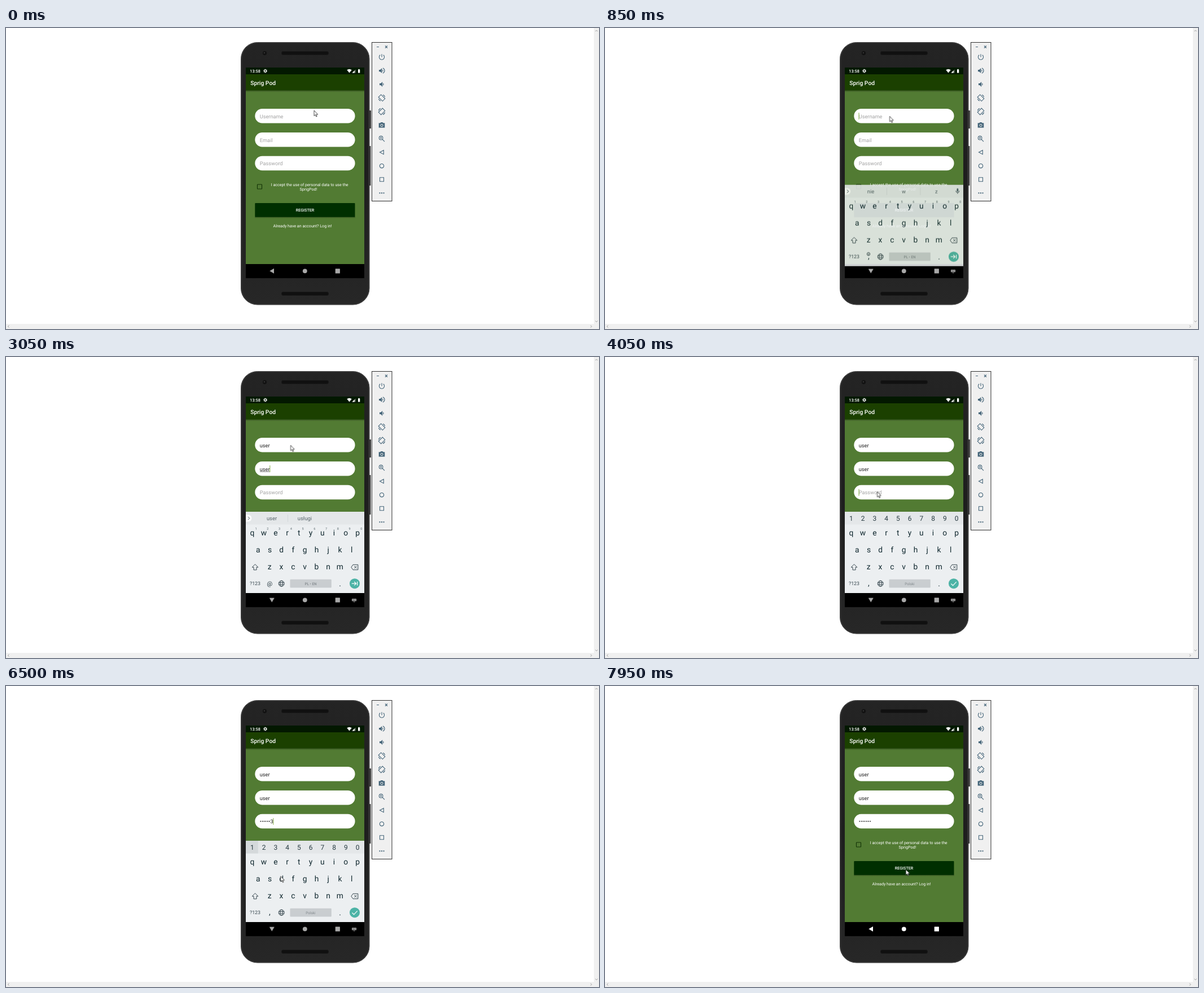
An HTML page for the animation above (8000 ms loop, 1051 by 533 pixels).

```html
<!DOCTYPE html>
<html lang="en">
<head>
<meta charset="utf-8">
<title>Register form</title>
<style>
html, body { margin: 0; width: 100%; height: 100%; overflow: hidden; background: #fff; }
svg { display: block; width: 100%; height: 100%; }
text { font-family: Roboto, "Noto Sans", sans-serif; text-rendering: geometricPrecision; }
.mid { text-anchor: middle; }
.white { fill: #fff; }
.line { fill: none; stroke: #46667a; stroke-width: 1.1; }
.solid { fill: #46667a; }
.key { font-size: 13.8px; fill: #10282f; }
.sup { font-size: 5.6px; fill: #5d6b71; }
.digit { font-size: 12px; fill: #263940; }
.word { font-size: 9.4px; fill: #56646a; }
.icon { fill: none; stroke: #37474f; stroke-width: 1; }
.lang { font-size: 6.4px; fill: #82898d; }

.loop { animation: 8s step-end infinite; }
#cursor { animation-name: point; }
#board { animation-name: board; }
#back { animation-name: turn; transform-origin: 471.3px 430.3px; }
#hide { animation-name: hide; }
#ripple { animation-name: ripple; }
#nav { animation-name: wake; }

@keyframes point {
  0% { transform: translate(546px, 146px); animation-timing-function: steps(4); }
  2.5%, 42.5% { transform: translate(504.5px, 156.3px); }
  42.5% { animation-timing-function: steps(6); }
  46.25%, 79.375% { transform: translate(482.5px, 238.5px); }
  79.375% { animation-timing-function: steps(3); }
  81.25% { transform: translate(486.7px, 336.7px); animation-timing-function: steps(4); }
  83.75% { transform: translate(485px, 451px); animation-timing-function: steps(7); }
  88.125%, 90% { transform: translate(472px, 431px); }
  90% { animation-timing-function: steps(2); }
  91.25% { transform: translate(497.7px, 421.5px); animation-timing-function: steps(8); }
  96.25% { transform: translate(529px, 343px); animation-timing-function: steps(5); }
  99.375%, 100% { transform: translate(533.2px, 325px); }
}
@keyframes board {
  0% { opacity: 0; transform: translateY(9px); }
  10% { opacity: .6; transform: translateY(9px); }
  10.625% { opacity: .88; transform: translateY(3.7px); }
  11.25% { opacity: .97; transform: translateY(1px); }
  11.875% { opacity: 1; transform: none; }
  90.625% { opacity: .95; transform: translateY(2px); }
  91.25% { opacity: .8; transform: translateY(6px); }
  91.875% { opacity: .5; transform: translateY(10px); }
  92.5% { opacity: .2; transform: translateY(13px); }
  93.125%, 100% { opacity: 0; transform: translateY(14px); }
}
@keyframes turn {
  0% { transform: rotate(0deg); }
  6.875% { transform: rotate(-45deg); }
  7.5% { transform: rotate(-90deg); }
  90.625%, 100% { transform: rotate(0deg); }
}
@keyframes hide {
  0% { opacity: 0; }
  6.875% { opacity: .5; }
  7.5% { opacity: 1; }
  90.625%, 100% { opacity: 0; }
}
@keyframes ripple {
  0% { opacity: 0; }
  90% { opacity: .6; }
  90.625% { opacity: 1; animation-timing-function: steps(6); }
  95%, 100% { opacity: 0; }
}
@keyframes wake {
  0%, 90% { fill: #a9a9a9; }
  90% { animation-timing-function: steps(6); }
  93.75%, 100% { fill: #fff; }
}
</style>
</head>
<body>
<svg viewBox="0 0 1051 533" preserveAspectRatio="none">
  <defs>
    <linearGradient id="body" x2="0" y2="1">
      <stop offset="0" stop-color="#242424"/><stop offset=".5" stop-color="#1e1e1e"/><stop offset="1" stop-color="#272727"/>
    </linearGradient>
    <linearGradient id="shade" x2="0" y2="1">
      <stop offset="0" stop-opacity=".28"/><stop offset="1" stop-opacity="0"/>
    </linearGradient>
  </defs>

  <!-- window scrollbars -->
  <path d="M1042 0h9v533H0v-9h1042z" fill="#f0f0f0"/>
  <path d="M1044.5 6l2-2 2 2M1044.5 518.500l2 2 2-2M5.500 526.500l-2 2 2 2M1036 526.500l2 2-2 2" fill="none" stroke="#999"/>

  <!-- phone -->
  <path d="M644 146h3v32h-3zM644 209h2.500v70h-2.500z" fill="#353535"/>
  <rect x="416.500" y="25.500" width="227.500" height="464.500" rx="29" fill="#2d2d2d" stroke="#454545"/>
  <rect x="418.500" y="27.500" width="223.500" height="460.500" rx="27" fill="url(#body)"/>
  <g fill="#101010" stroke="#181818">
    <rect x="488.500" y="41.500" width="83" height="6" rx="2.500"/>
    <rect x="488.500" y="467.500" width="83" height="6" rx="2.500"/>
    <circle cx="458.500" cy="44.500" r="3.500"/>
  </g>
  <circle cx="458" cy="44" r="1.300" fill="#343434"/>

  <!-- app -->
  <rect x="425" y="70" width="210" height="373" fill="#527b33"/>
  <rect x="425" y="70" width="210" height="12.300" fill="#031800"/>
  <rect x="425" y="82" width="210" height="28.700" fill="#1b4000"/>
  <rect x="425" y="110.700" width="210" height="3" fill="url(#shade)"/>
  <text x="432.300" y="79" font-size="7.300" font-weight="500" class="white">13:58</text>
  <circle cx="459.600" cy="76" r="1.900" fill="none" stroke="#fff" stroke-width="1.300"/>
  <circle cx="459.600" cy="76" r="2.900" fill="none" stroke="#fff" stroke-width="1" stroke-dasharray="1.500 1.537"/>
  <path d="M604.300 74.300q4.200-3.200 8.400 0L608.500 79.500z" class="white"/>
  <path d="M613.500 79.500l6-6v6z" fill="#fff" opacity=".45"/>
  <path d="M613.500 79.500l4-4v4zM624 73.500h.8v-.8h1.600v.8h.9v6H624z" class="white"/>
  <text x="433.200" y="100.700" font-size="10.300" font-weight="500" class="white">Sprig Pod</text>

  <g id="fields"></g>
  <rect id="caret" width="1" height="12" fill="#86b049"/>

  <rect x="445.500" y="277" width="8" height="8" rx=".6" fill="none" stroke="#123306" stroke-width="1.100"/>
  <g class="mid white" font-size="7.150">
    <text x="538.200" y="279.700">I accept the use of personal data to use the</text>
    <text x="536" y="288.200">SprigPod!</text>
    <text x="525.500" y="352.700">Already have an account? Log in!</text>
  </g>
  <rect x="441" y="334" width="178" height="3.500" fill="url(#shade)"/>
  <rect x="441.300" y="310" width="177.200" height="24.800" rx="1" fill="#002f00"/>
  <text x="530" y="325.200" font-size="7.150" font-weight="500" class="mid white">REGISTER</text>

  <!-- navigation bar -->
  <rect x="425" y="418" width="210" height="25" fill="#000"/>
  <rect id="ripple" class="loop" x="446" y="419.500" width="50.500" height="22" rx="11" fill="#202020"/>
  <g id="nav" class="loop">
    <path id="back" class="loop" d="M467.300 430.300L475 425.800v9z"/>
    <circle cx="529.800" cy="430.300" r="3.900"/>
    <rect x="583.700" y="426.300" width="8.200" height="8.200" rx=".5"/>
    <g id="hide" class="loop">
      <rect x="613" y="428" width="8" height="4.300" rx=".5"/>
      <path d="M615.500 433h3l-1.500 1.400z"/>
      <path d="M614 429.300h6M614 430.600h6" stroke="#000" stroke-width=".6" stroke-dasharray=".7 .6"/>
    </g>
  </g>

  <!-- on-screen keyboard -->
  <g id="board" class="loop">
    <rect x="425" y="274" width="210" height="144" fill="#eceff1"/>
    <rect x="425" y="274" width="210" height="22.500" fill="#e4e7e9"/>
    <g data-modes="01">
      <path d="M425 279.500h4.300a6 6 0 0 1 0 12H425z" class="white"/>
      <path d="M429 282.800l2.700 2.700-2.700 2.700" class="icon"/>
      <g id="words"></g>
    </g>
    <g data-modes="0">
      <rect x="623.500" y="280.300" width="2.800" height="5.800" rx="1.400" fill="#455a64"/>
      <path d="M621.800 284.500a3.100 3.100 0 0 0 6.200 0M624.900 287.600v2.200" class="icon"/>
    </g>
    <rect id="pressed" x="425" y="274" width="21.800" height="22.500" fill="#d5d9db"/>
    <g id="digits" data-modes="2"></g>
    <g id="keys"></g>
    <g id="sups" data-modes="01"></g>

    <path d="M441.500 367l5.300 5.300h-2.800v4.700h-5v-4.700h-2.800z" class="icon"/>
    <path d="M611.800 372.300l3.200-4.500h8.800v9H615zM617.300 370.200l4.200 4.200m0-4.200l-4.200 4.200" class="icon"/>
    <text x="441.500" y="404.400" font-size="8.800" fill="#37474f" class="mid">?123</text>
    <g data-modes="0">
      <circle cx="467" cy="396.500" r="2.700" class="icon" stroke-width=".7"/>
      <path d="M465.700 397.200q1.300 1.300 2.600 0M465.900 395.600h.7M467.500 395.600h.7" class="icon"/>
    </g>
    <text x="467.300" y="405" class="key mid" data-modes="02">,</text>
    <text x="467.300" y="405" font-size="10.800" fill="#263940" class="mid" data-modes="1">@</text>
    <g class="icon">
      <circle cx="488.200" cy="401.200" r="5"/>
      <ellipse cx="488.200" cy="401.200" rx="2.200" ry="5"/>
      <path d="M483.700 399.500h9M483.700 402.900h9"/>
    </g>
    <rect x="503.500" y="393.800" width="73.300" height="14.700" rx="1" fill="#c9cdd0"/>
    <text x="540" y="403.500" class="lang mid" font-weight="500" data-modes="01">PL • EN</text>
    <text x="540" y="403.500" class="lang mid" data-modes="2">Polski</text>
    <text x="592" y="405.500" class="key mid">.</text>
    <circle cx="618" cy="401.200" r="9" fill="#4db3a6"/>
    <g fill="none" stroke="#fff" stroke-width="1.200">
      <path d="M612.800 401.200h7.500M617.300 398l3.200 3.200-3.200 3.200M622.600 397.800v6.800" data-modes="01"/>
      <path d="M613.500 401.500l3.100 3.100 6-6.300" data-modes="2"/>
    </g>
  </g>

  <!-- emulator tool strip -->
  <rect x="648.500" y="25.500" width="35.500" height="281" fill="#f0f0f0" stroke="#303030"/>
  <path d="M657 33.500h4M672 31.500l4 4m0-4l-4 4" class="line"/>
  <g id="tools"></g>

  <path id="cursor" class="loop" d="M0 0v9.600l2.200-2 1.500 3.500 1.500-.7-1.500-3.300h3z" fill="#fff" stroke="#222" stroke-width=".8"/>
</svg>

<script>
const LOOP = 8000, STEP = 50, LEFT = 449.800, KEY_W = 20.750;
const $ = id => document.getElementById(id);

function add(parent, tag, attrs, text = '') {
  const el = document.createElementNS('http://www.w3.org/2000/svg', tag);
  for (const name in attrs) el.setAttribute(name, attrs[name]);
  el.textContent = text;
  parent.appendChild(el);
  return el;
}

// One line of evenly spaced labels
function row(parent, chars, x, y, cls) {
  [...chars].forEach((c, i) => add(parent, 'text', { x: x + i * KEY_W, y, class: cls + ' mid' }, c));
}
row($('keys'), 'qwertyuiop', 436.300, 316, 'key');
row($('keys'), 'asdfghjkl', 446.700, 346.200, 'key');
row($('keys'), 'zxcvbnm', 467.300, 376.300, 'key');
row($('sups'), '1234567890', 443, 306, 'sup');
row($('digits'), '1234567890', 436.300, 290.300, 'digit');

// Tool icons: outline and filled part, drawn around the centre
const tilt = 'M-5.800 -1.300L-1.300 -5.800L5.800 1.300L1.300 5.800zM2 -5.300q3 .8 3.500 3.800M-2 5.300q-3 -.8 -3.500 -3.800';
const tools = [
  ['M-2.800 -3.700A4.600 4.600 0 1 0 2.800 -3.700M0 -5.300V0'],
  ['M1.900 -4.500a4.800 4.800 0 0 1 0 9', 'M-5 -1.700h2.300L.2 -4.500v9L-2.700 1.700H-5zM1.300 -2.300a2.700 2.700 0 0 1 0 4.600z'],
  ['', 'M-4 -1.700h2.300L1.200 -4.500v9L-1.700 1.700H-4zM2.300 -2.300a2.700 2.700 0 0 1 0 4.600z'],
  [tilt],
  [tilt],
  ['', 'M-5.300 -3.600h2.700l1 -1.200h3.200l1 1.200h2.700v8.200H-5.300z'],
  ['M-4.700 -1.300a3.300 3.300 0 1 0 6.600 0a3.300 3.300 0 1 0 -6.600 0M1 1.200l4 4M-3 -1.300h3.200M-1.400 -2.900v3.200'],
  ['M-3.500 0L3.300 -3.600v7.200z'],
  ['M-3.700 0a3.700 3.700 0 1 0 7.400 0a3.700 3.700 0 1 0 -7.400 0'],
  ['M-3.500 -3.500h7v7h-7z'],
  ['', 'M-4.500 -1h2v2h-2zM-1 -1h2v2h-2zM2.500 -1h2v2h-2z']
];
tools.forEach(([line, solid], i) => {
  const flip = i === 4 ? ' scale(-1 1)' : '';
  const g = add($('tools'), 'g', { transform: `translate(666 ${51.500 + i * 24.080})${flip}` });
  if (solid) add(g, 'path', { d: solid, class: 'solid' });
  if (line) add(g, 'path', { d: line, class: 'line' });
  if (i === 5) add(g, 'circle', { cy: .5, r: 2.100, fill: '#46667a', stroke: '#f0f0f0' });
});

// focus: when the caret enters; done: when the composing underline goes
const fields = [
  { hint: 'Username', focus: 450, done: 1850, keys: [[1200, 'u'], [1300, 'us'], [1450, 'use'], [1600, 'user']] },
  { hint: 'Email', focus: 1850, done: 3950, keys: [[2600, 'u'], [2700, 'us'], [2850, 'use'], [3050, 'user']] },
  { hint: 'Password', focus: 4000, done: 0, keys: [] }
];
const secret = 'user123';
[5150, 5250, 5400, 5550, 5950, 6050, 6100].forEach((at, i) =>
  fields[2].keys.push([at, '•'.repeat(i) + secret[i]]));
fields[2].keys.push([7600, '•'.repeat(7)]);

fields.forEach((f, i) => {
  const y = f.y = 143 + i * 41.900;
  add($('fields'), 'rect', { x: 441.300, y, width: 177.300, height: 25.500, rx: 12.750, fill: '#fff' });
  f.text = add($('fields'), 'text', { x: LEFT, y: y + 16.600, 'font-size': 9.200 });
  f.under = add($('fields'), 'rect', { x: LEFT, y: y + 17.800, height: .7, fill: '#444' });
});

const hints = [
  [0, 'nie', 'w', 'z'], [1250, 'u', 'już', 'usta'], [1350, 'us', 'usługi', 'usta'],
  [1450, 'use', 'usługi', 'usunąć'], [1600, 'user', 'usera', 'userami'], [1900],
  [2700, 'us', 'usługi'], [2850, 'use', 'usługi'], [3050, 'user', 'usługi'], [3950]
];
const words = [471, 529.500, 587.300].map(x => add($('words'), 'text', { x, y: 288.600, class: 'word mid' }));
const bars = [499, 558.500].map(x => add($('words'), 'rect', { x, y: 279, width: .8, height: 13, fill: '#cfd4d6' }));

const last = (list, t) => list.filter(e => e[0] <= t).pop();
const show = (el, on) => { el.style.display = on ? '' : 'none'; };
const modal = [...document.querySelectorAll('[data-modes]')];

function draw(t) {
  let active = null;
  for (const f of fields) {
    const key = last(f.keys, t);
    f.text.textContent = key ? key[1] : f.hint;
    f.text.setAttribute('fill', key ? '#222' : '#a3a3a3');
    f.width = key ? f.text.getComputedTextLength() : 0;
    f.under.setAttribute('width', f.width);
    show(f.under, key && t < f.done);
    if (t >= f.focus) active = f;
  }
  const caret = $('caret');
  show(caret, false);
  if (active) {
    const typed = last(active.keys.filter(k => k[0] < 7000), t);
    const since = t - (typed ? typed[0] : active.focus);
    show(caret, since % 1000 < 500);
    caret.setAttribute('x', LEFT - .3 + active.width);
    caret.setAttribute('y', active.y + 7);
  }
  const mode = t < 1900 ? '0' : t < 4050 ? '1' : '2';
  modal.forEach(el => show(el, el.dataset.modes.includes(mode)));
  show($('pressed'), t >= 5950);
  const offer = last(hints, t);
  words.forEach((w, i) => { w.textContent = offer[i + 1] || ''; });
  bars.forEach((b, i) => show(b, offer[i + 2]));
}

let start = null;
function tick(now) {
  if (start === null) start = now;
  const t = (now - start) % LOOP;
  draw(Math.floor(t / STEP + .01) * STEP);
  requestAnimationFrame(tick);
}
draw(0);
requestAnimationFrame(tick);
</script>
</body>
</html>
```
